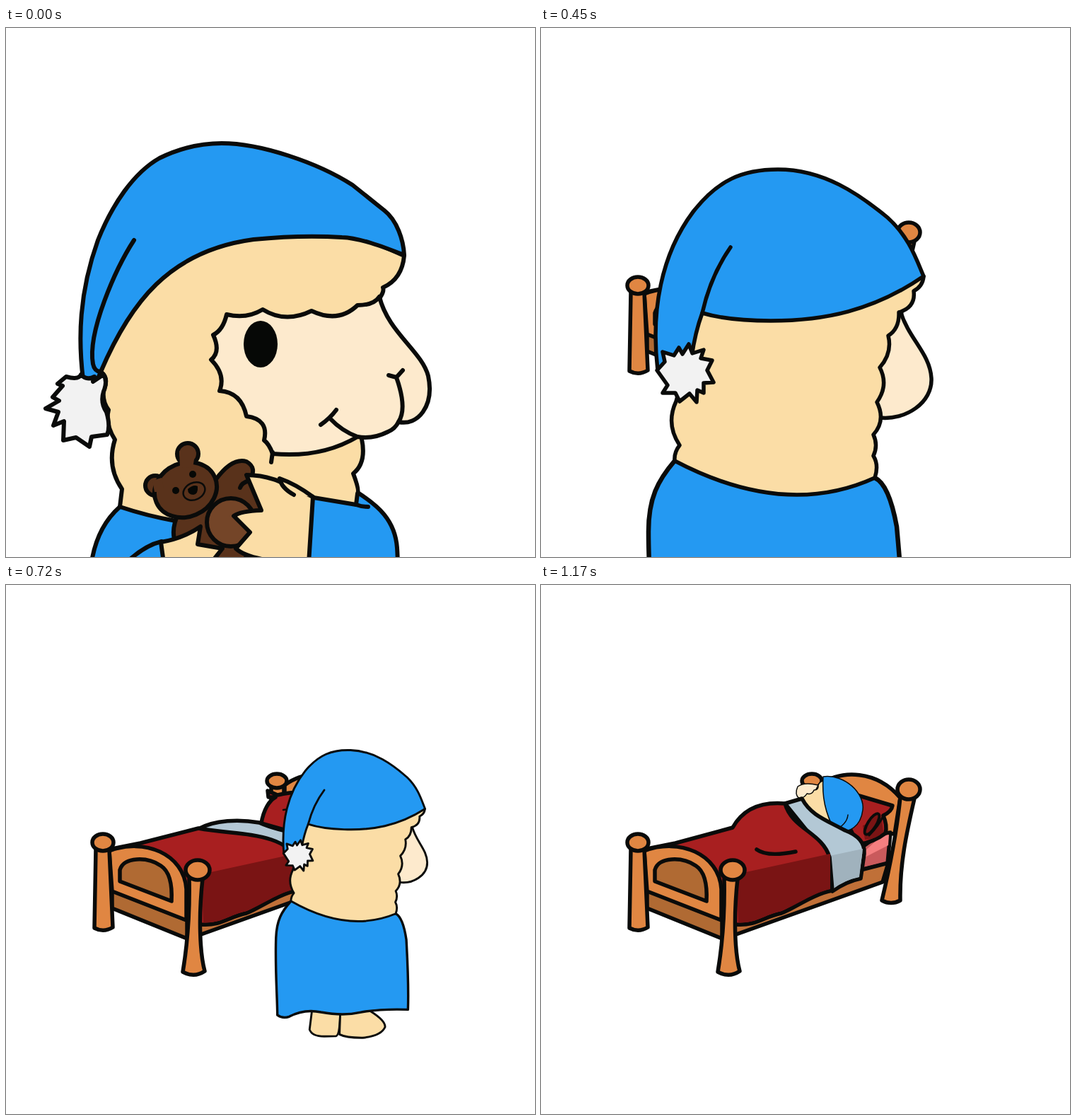
An HTML page that plays this animation: 748x748 px, repeating every 1530 ms.

```html
<!DOCTYPE html>
<html lang="en">
<head>
<meta charset="utf-8">
<title>Bedtime</title>
<style>
  html, body { margin: 0; width: 100%; height: 100%; overflow: hidden; background: #fff; }
  svg { display: block; width: 100vw; height: 100vh; }
  path, ellipse, circle { stroke: #0a0b0a; stroke-width: 5.5; stroke-linejoin: round; stroke-linecap: round; }
  #front > * { stroke-width: 6; }
  .line { fill: none; }
  .flat, #front > .flat { stroke: none; }
  .thin { stroke-width: 1.5; }
  .ink { fill: #060806; stroke: none; }
  #front > .ink { stroke: none; }
  #front > .fine { stroke-width: 2.5; }
  .blue { fill: #2499f2; }
  .wool { fill: #fbdda6; }
  .skin { fill: #fdeacd; }
  .puff { fill: #f2f2f2; }
  .wood { fill: #e08642; }
  .shade { fill: #b06a33; }
  .red { fill: #a81f20; }
  .dark { fill: #7a1414; }
  .sheet { fill: #b3c8d5; }
  .sheet2 { fill: #a0b2bd; }
  .fur { fill: #59321b; }
  .belly { fill: #744528; }
</style>
</head>
<body>
<svg viewBox="0 0 748 748">
  <!-- head end of the bed -->
  <path class="wood" d="M375 284V304H393V284Z"/>
  <ellipse class="wood" cx="383" cy="277" rx="14" ry="10"/>
  <path class="wood" d="M394 283C425 260 475 262 508 301L500 352L394 345Z"/>
  <path d="M452 372L480 352L494 350L490 394L452 403Z" fill="#c95a5c"/>
  <path class="flat" d="M458 376L480 356L492 353L491 368L458 385Z" fill="#f47f80"/>
  <path class="shade" d="M255 470L412 400L452 403L491 393L483 420L276 494Z" style="fill:#c07038"/>
  <path class="wood" d="M508 300C503 350 493 400 482 446Q495 453 508 446C507 395 517 350 528 302Z"/>
  <ellipse class="wood" cx="520" cy="289" rx="16" ry="14"/>

  <g id="made">
    <path class="red" d="M361 337C364 318 372 305 381 300L371 300L370 291L384 297C420 288 470 295 497 312L482 352L435 358Z"/>
    <path class="line" d="M392 318C410 314 420 325 438 329M425 323Q433 324 442 321" style="stroke-width:2.5"/>
    <path class="sheet" d="M272 345C295 332 330 331 358 336C385 348 412 350 432 355Q458 362 457 380L451 416Q430 420 412 433L405 380Z"/>
    <path class="sheet2 flat" d="M408 384L455 372L449 414Q430 418 414 429Z"/>
    <path class="red" d="M150 373L190 365L272 344C310 351 345 350 375 360Q405 370 410 390L412 432C385 437 360 456 340 464C315 469 305 482 276 480L200 420Z"/>
  </g>

  <g id="asleep">
    <path class="red" d="M450 298L497 312Q496 320 484 326Q490 340 487 351Q470 364 448 367L430 330Z"/>
    <path class="dark flat" d="M455 340L458 360Q474 360 484 349L482 332Z"/>
    <ellipse class="dark" cx="468" cy="338" rx="6" ry="17" transform="rotate(32 468 338)" style="stroke-width:4"/>
    <path class="line" d="M484 326Q478 340 464 354" style="stroke-width:3"/>
    <path class="skin thin" d="M392 283Q372 278 363 285Q358 296 365 302L380 306Z"/>
    <path class="wool thin" d="M399 277Q394 278 392 283Q393 290 386 290Q383 297 376 295Q372 302 365 301L372 318L415 348Z"/>
    <path class="blue thin" d="M399 271C430 267 458 295 455 318C452 341 437 352 415 347C402 322 397 300 399 271Z"/>
    <path class="line thin" d="M414 347C426 342 433 335 434 325"/>
    <path class="sheet" d="M345 309L369 302C381 325 402 332 430 347Q459 358 457 380L452 415Q432 419 412 433L404 382Z"/>
    <path class="sheet2 flat" d="M408 383L455 373L450 413Q430 417 414 429Z"/>
    <path class="red" d="M150 373L190 365L271 343C285 318 310 306 345 309C355 345 398 350 408 385L412 432C385 437 360 456 340 464C315 469 305 482 276 480L200 420Z"/>
  </g>
  <path class="dark flat" d="M276 409L409 380V430C385 435 360 453 340 461C315 466 305 479 279 477Z"/>
  <path id="crease" class="line" d="M305 374Q320 385 360 377"/>

  <!-- foot end of the bed -->
  <path class="shade" d="M150 432L256 474V500L150 457Z"/>
  <path class="wood" d="M146 376C195 357 252 380 255 430V474L150 433Z"/>
  <path class="shade" d="M161 419V403C166 384 200 384 219 397Q236 408 234 447Z"/>
  <path class="wood" d="M127 374H146L151 484Q138 492 125 485Z"/>
  <ellipse class="wood" cx="137" cy="364" rx="15" ry="12"/>
  <path class="wood" d="M259 415H278C272 470 274 520 281 546Q266 556 250 547C257 505 260 460 259 415Z"/>
  <ellipse class="wood" cx="271" cy="403" rx="17" ry="14"/>

  <g id="front">
    <path class="blue" d="M161 677C135 700 125 730 121 755C117 790 125 820 130 860H545C552 820 556 780 553 735C550 695 525 675 499 658Z"/>
    <path class="wool" d="M134 486Q146 495 138 512Q136 528 145 540Q140 560 154 582Q142 620 164 652L161 677Q200 690 240 697L435 664L495 674L497 658Q500 654 491 630Q510 615 503 581L529 381Q535 372 533 367Q560 355 563 322L400 250L200 300Z"/>
    <path class="line" d="M495 674Q503 677 512 677M169 757Q195 732 220 726"/>
    <path class="blue" d="M109 497C102 440 103 375 130 300C150 250 180 205 217 184Q260 163 305 163C360 163 440 190 490 222L535 258C553 272 562 300 563 321C530 308 500 297 475 296C430 293 390 295 350 299C230 315 175 390 134 486L129 498Z"/>
    <path class="line" d="M181 300C155 340 115 430 123 475Q125 485 133 486"/>
    <path class="puff" d="M138 490L123 500L125 493Q114 499 106 490Q103 498 85 493L73 503L80 506L66 522L75 527L56 538L74 543L67 562L82 556L81 583L99 579L118 592L121 578L143 575Q148 563 142 543Q133 530 138 514Q144 500 138 490Z"/>
    <path class="skin" d="M312 405Q340 412 363 398Q395 418 432 400Q470 418 497 392Q520 392 528 380C540 430 588 457 597 492C606 535 582 563 555 557Q550 567 540 571Q518 582 497 578C460 600 420 606 377 602Q372 588 365 583Q372 553 340 549Q333 515 302 513Q311 490 290 469Q304 458 293 434Q307 427 312 405Z"/>
    <path class="line" d="M377 600L375 614M541 491L552 494L561 484M552 494C563 525 563 545 555 557M497 578Q475 570 458 552M445 561Q458 552 467 540"/>
    <ellipse class="ink" cx="360" cy="447" rx="24" ry="33"/>

    <path class="fur" d="M244 686C232 710 234 742 262 742L306 755Q318 775 334 764L355 700L362 680Q359 655 344 640Q356 622 340 613Q320 607 297 638Z"/>
    <path class="line" d="M344 640Q333 643 331 650"/>
    <circle class="fur" cx="257" cy="602" r="15"/>
    <circle class="fur" cx="211" cy="647" r="14"/>
    <circle class="belly" cx="318" cy="699" r="34"/>
    <ellipse class="fur" cx="254" cy="653" rx="45" ry="38" transform="rotate(-23 254 653)"/>
    <path class="flat fur" d="M245 598H268L264 622L246 621ZM207 640L220 636L224 656L210 656Z"/>
    <ellipse class="line fine" cx="266" cy="655" rx="16" ry="12" transform="rotate(-25 266 655)"/>
    <path class="ink" d="M257 652Q265 645 271 648Q272 659 265 660Q257 660 257 652Z"/>
    <circle class="ink" cx="264" cy="631" r="5"/>
    <circle class="ink" cx="240" cy="654" r="5"/>

    <path class="wool" d="M219 727Q250 722 275 705L271 730L306 736L287 760L300 766V800H229Z"/>
    <path class="wool" d="M340 632C375 632 395 645 434 663L428 757Q345 755 325 736L345 713L322 690Q332 683 361 682Z"/>
    <path class="wool" d="M407 660Q389 650 387 637Q410 645 434 663"/>
  </g>

  <g id="back">
    <path class="wool" d="M256 900L251 956Q258 974 291 973L323 971Q333 968 332 900Z"/>
    <path class="wool" d="M332 900V966Q350 975 395 973Q445 966 454 942Q455 925 412 900Z"/>
    <path class="blue" d="M189 612C165 640 152 665 152 712C152 790 160 860 163 920Q178 930 195 923Q235 900 280 908Q340 917 385 905Q440 893 514 893C514 830 508 760 503 705Q492 645 472 636Z" style="stroke-width:6.5"/>
    <path class="skin" d="M508 400C520 440 550 460 552 495C554 530 515 555 479 551L460 480Z"/>
    <path class="wool" d="M225 400L191 528Q176 560 196 590Q188 600 189 612Q345 694 472 636Q478 618 470 605Q477 590 470 575Q488 555 475 529Q492 505 479 480Q497 460 491 435Q507 425 506 402Q530 395 527 372Q540 365 541 351Z"/>
    <path class="blue" d="M165 484C155 400 170 320 215 260C250 215 285 200 335 200C400 200 450 235 490 268C520 295 530 325 541 351C470 400 400 414 325 414Q265 414 228 403Q218 430 213 465Z"/>
    <path class="line" d="M268 310Q240 350 228 403"/>
    <path class="puff" d="M164 484L175 472L172 458L188 463L195 452L200 461L209 447L214 460L230 455L226 467L242 470L235 484L244 501L230 502L230 516L221 512L220 529L210 517L196 528L190 516L172 516L179 505Z"/>
  </g>
</svg>
<script>
  const LOOP = 1530;
  const get = id => document.getElementById(id);
  // Each pose moves a pivot (eye or hat fold) to x, y, then scales, mirrors and tilts around it.
  const pivots = { front: [360, 447], back: [268, 310] };
  const poses = [
    { from: 0, who: "front", x: 360, y: 447, scale: 1, tilt: 0 },
    { from: 270, who: "front", x: 366, y: 457, scale: .905, tilt: 6 },
    { from: 360, who: "back", x: 267, y: 311, scale: 1.04, tilt: 1 },
    { from: 450, who: "back", x: 268, y: 310, scale: 1, tilt: 0 },
    { from: 540, who: "back", x: 335, y: 303, scale: .79, tilt: 0 },
    { from: 630, who: "back", x: 402, y: 297, scale: .626, tilt: -.5 },
    { from: 720, who: "back", x: 450, y: 290, scale: .525, tilt: 2 },
    { from: 810, who: "back", x: 496, y: 289, scale: .476, tilt: 3.5 },
    { from: 900, who: "back", x: 509, y: 318, scale: .4, tilt: 3.5, mirror: true },
    { from: 990, who: "back", x: 518, y: 347, scale: .338, tilt: 3.5, mirror: true },
    { from: 1080, who: "back", x: 484, y: 332, scale: .3, tilt: 0, mirror: true },
    { from: 1170, who: "bed" }
  ];

  const show = (id, on) => get(id).setAttribute("visibility", on ? "visible" : "hidden");

  function draw(time) {
    const pose = poses.findLast(p => p.from <= time);
    const inBed = pose.who === "bed";
    show("made", !inBed);
    show("asleep", inBed);
    show("crease", inBed);
    for (const who in pivots) show(who, pose.who === who);
    if (inBed) return;
    const { x, y, scale, tilt, mirror } = pose;
    const [px, py] = pivots[pose.who];
    get(pose.who).setAttribute("transform",
      `translate(${x} ${y}) scale(${mirror ? -scale : scale} ${scale}) rotate(${tilt}) translate(${-px} ${-py})`);
  }

  const start = performance.now();
  function tick() {
    draw((performance.now() - start) % LOOP);
    requestAnimationFrame(tick);
  }
  tick();
</script>
</body>
</html>
```
